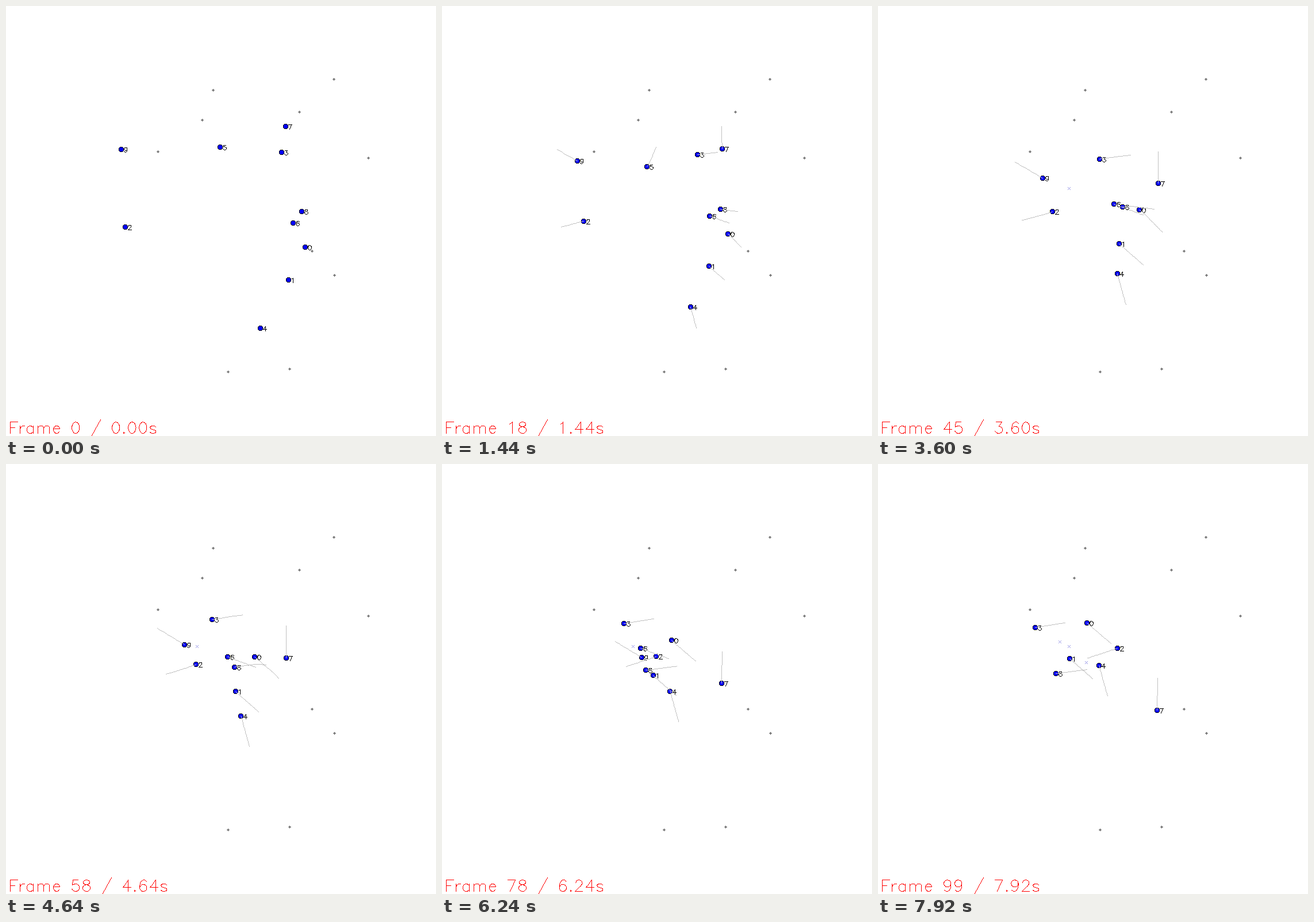
A matplotlib script that plays this animation: 748 px wide and 748 px high, repeating every 8000 ms.

```python
import numpy as np
import matplotlib.pyplot as plt
from matplotlib.animation import FuncAnimation

SIZE, DPI = 748, 100
FRAMES, INTERVAL = 100, 80
TRAIL = 25      # frames of path kept behind an agent
SPEED = 2.215   # pixels per frame
BEND = 0.4      # share of the walk at which an agent changes course

WHITE, BLACK, BLUE, RED = (255, 255, 255), (0, 0, 0), (0, 0, 255), (255, 0, 0)
GRAY, PALE_GRAY, PALE_BLUE = (128, 128, 128), (192, 192, 192), (150, 150, 230)

# Start, bend and end of each walk, and the frame in which it ends.
WALKS = [
    ((520, 419), (463.6, 361.8), (363, 276), 99),
    ((491, 476), (428, 421), (333, 338), 99),
    ((207, 384), (292, 361), (416, 320), 99),
    ((479, 254), (396, 264), (273, 284), 99),
    ((442, 560), (419, 477), (384, 350), 99),
    ((372, 245), (358.7, 275), (332, 317), 39),
    ((499, 377), (425.5, 350), (316, 309), 93),
    ((486, 209), (487.5, 296), (485, 428), 99),
    ((514, 357), (437, 347.5), (309, 364), 99),
    ((200, 249), (266, 287), (362, 345), 86),
]
GOALS = [(570, 127), (360, 146), (510, 184), (341, 198), (264, 253),
         (630, 264), (532, 426), (571, 468), (493, 631), (386, 636)]


def arc(cx, cy, rx, ry, start, stop):
    a = np.radians(np.linspace(start, stop, max(6, int(abs(stop - start) / 20))))
    return list(zip(cx + rx * np.cos(a), cy + ry * np.sin(a)))


def half_turn(points, width, height):
    return [(width - x, height - y) for x, y in points]


def make_glyphs():
    """Single-stroke letters: advance width and strokes, y up from the baseline."""
    six = [arc(11.5, 10, 7.5, 11, 50, 180) + arc(10.5, 6.5, 6.5, 6.5, 180, 540)]
    curl = arc(8.5, 10.7, 5.5, 3.3, 15, 235)
    stem = [(4, 14), (4, 0)]
    return {
        " ": (16, []),
        "0": (20, [arc(10, 10.5, 7, 10.5, 0, 360)]),
        "1": (20, [[(6, 17), (8, 18), (11, 21), (11, 0)]]),
        "2": (20, [arc(10, 15.5, 6, 5.5, 175, -25) + [(13, 10), (3, 0), (17, 0)]]),
        "3": (20, [[(5, 21), (16, 21), (10, 13)] + arc(10, 6.5, 7, 6.5, 80, -160)]),
        "4": (20, [[(13, 0), (13, 21), (3, 7), (18, 7)]]),
        "5": (20, [[(15, 21), (5, 21), (4, 12)] + arc(10, 7, 7, 7, 125, -160)]),
        "6": (20, six),
        "7": (20, [[(3, 21), (17, 21), (7, 0)]]),
        "8": (20, [arc(10, 16.7, 6, 4.3, 0, 360), arc(10, 6.2, 7, 6.2, 0, 360)]),
        "9": (20, [half_turn(s, 20, 21) for s in six]),
        "F": (18, [[(4, 0), (4, 21), (17, 21)], [(4, 11), (12, 11)]]),
        "r": (13, [stem, arc(10, 8, 6, 6, 180, 70)]),
        "a": (19, [[(15, 14), (15, 0)], arc(9.5, 7, 6.5, 7, 35, 325)]),
        "m": (30, [stem] + [[(x, 10)] + arc(x + 6, 10, 5, 4, 135, 0) + [(x + 11, 0)]
                            for x in (4, 15)]),
        "e": (18, [[(3, 8)] + arc(9, 7, 6, 7, 8, 325)]),
        "s": (17, [curl + half_turn(curl, 17, 14)[::-1]]),
        ".": (10, [arc(5, 1, 1, 1, 0, 360)]),
        "/": (22, [[(20, 25), (2, -7)]]),
    }


GLYPHS = make_glyphs()


def plot_pixels(canvas, points, color):
    x, y = np.floor(np.transpose(points) + 0.5).astype(int)
    inside = (x >= 0) & (x < SIZE) & (y >= 0) & (y < SIZE)
    canvas[y[inside], x[inside]] = color


def draw_line(canvas, points, color):
    """Hard-edged polyline, one pixel wide."""
    points = np.asarray(points, float)
    for a, b in zip(points, points[1:]):
        steps = int(np.ceil(np.abs(b - a).max())) + 1
        plot_pixels(canvas, np.linspace(a, b, steps), color)


def draw_disc(canvas, center, limit, color):
    """All pixels whose squared distance to the center is within the limit."""
    dy, dx = np.mgrid[-5:6, -5:6]
    near = dx ** 2 + dy ** 2 <= limit
    plot_pixels(canvas, np.column_stack([dx[near], dy[near]]) + center, color)


def draw_cross(canvas, center, color):
    for slope in (1, -1):
        draw_line(canvas, np.array([(-2, -2 * slope), (2, 2 * slope)]) + center, color)


def draw_text(canvas, text, x, y, scale, color):
    for char in text:
        advance, strokes = GLYPHS[char]
        for stroke in strokes:
            draw_line(canvas, np.array(stroke) * (scale, -scale) + (x, y), color)
        x += advance * scale


def position(walk, frames):
    """Wait until the bend can be reached in time, then walk bend and end."""
    *points, last = walk
    bend = BEND * last
    wait = max(0, bend - np.hypot(*np.subtract(points[1], points[0])) / SPEED)
    x, y = (np.interp(frames, [wait, bend, last], axis) for axis in zip(*points))
    return np.floor(np.column_stack([x, y]) + 0.5)


background = np.full((SIZE, SIZE, 3), WHITE, np.uint8)
for goal in GOALS:
    draw_disc(background, goal, 4, GRAY)

fig = plt.figure(figsize=(SIZE / DPI, SIZE / DPI), dpi=DPI, facecolor="white")
ax = fig.add_axes([0, 0, 1, 1])
ax.axis("off")
picture = ax.imshow(background, interpolation="nearest", aspect="auto")


def update(frame):
    canvas = background.copy()
    trails = []
    for number, walk in enumerate(WALKS):
        end, last = walk[2:]
        if last < FRAMES - 1 and frame >= last:
            draw_cross(canvas, end, PALE_BLUE)
            continue
        trail = position(walk, np.arange(max(0, frame - TRAIL), frame + 1))
        x, y = trail[-1]
        draw_disc(canvas, (x, y), 20, BLACK)
        draw_disc(canvas, (x, y), 13, BLUE)
        draw_text(canvas, str(number), x + 4, y + 5, 0.4, BLACK)
        trails.append(trail)
    for trail in trails:
        draw_line(canvas, trail, PALE_GRAY)
    seconds = frame * INTERVAL / 1000
    draw_text(canvas, f"Frame {frame} / {seconds:.2f}s", 3.5, 743, 0.945, RED)
    picture.set_data(canvas)
    return [picture]


animation = FuncAnimation(fig, update, frames=FRAMES, interval=INTERVAL,
                          repeat=True, repeat_delay=0)
plt.show()
```
